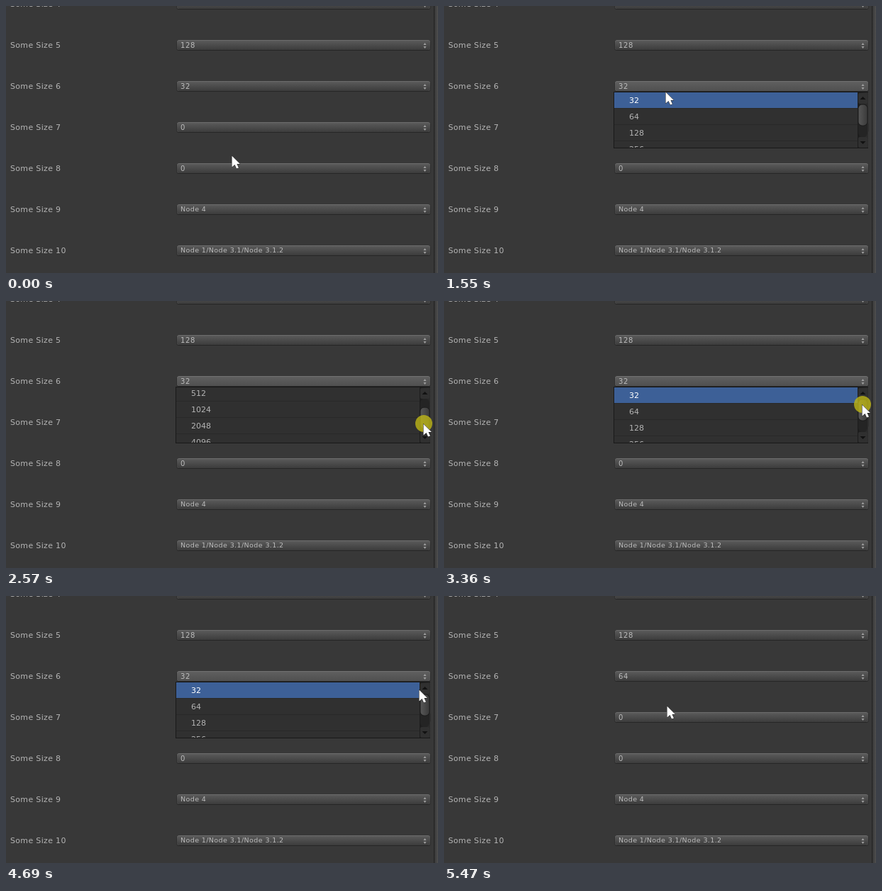
These frames come from a looping animation (609x377 px, 6170 ms). An HTML page with a canvas:

```html
<!DOCTYPE html>
<html lang="en">
<head>
<meta charset="utf-8">
<title>Dropdown demo</title>
<style>
  html, body { margin: 0; width: 100%; height: 100%; overflow: hidden; background: #383838; }
  canvas { display: block; }
</style>
</head>
<body>
<canvas id="stage" width="609" height="377"></canvas>
<script>
const ctx = document.getElementById('stage').getContext('2d');
const LOOP = 6170, TICK = 78;
const FONT = '"DejaVu Sans", Verdana, sans-serif';
const SIZES = Array.from({ length: 9 }, (_, i) => 32 << i);
const ROW = 23, VIEW_TOP = 122, VIEW_HEIGHT = 78;
const GRAB_Y = 160, SCROLL_GAIN = 7.3, MAX_SCROLL = SIZES.length * ROW - VIEW_HEIGHT - 1;
const OPEN = [1250, 5320], DRAG = [2330, 4060];
const PRESSES = [[1170, 1320], DRAG, [5240, 5470]];

// Pointer moves: first and last change, destination
const START = { x: 319, y: 211 };
const MOVES = [
  { from: 300, to: 710, x: 311, y: 121 },
  { from: 940, to: 1170, x: 297, y: 112 },
  { from: 1550, to: 1550, x: 313, y: 121 },
  { from: 1627, to: 2010, x: 589, y: 160 },
  { from: 2330, to: 2720, x: 589, y: 197 },
  { from: 2970, to: 3210, x: 590, y: 145 },
  { from: 3360, to: 3600, x: 588, y: 186 },
  { from: 3750, to: 3830, x: 586, y: 132 },
  { from: 4690, to: 5070, x: 315, y: 155 }
];

const clamp = (v, lo, hi) => Math.min(hi, Math.max(lo, v));
const within = (t, [from, to]) => t >= from && t < to;
const ease = p => p ** 2.5;

function pointerAt(t) {
  let { x, y } = START;
  for (const move of MOVES) {
    if (t < move.from) break;
    const steps = Math.round((move.to - move.from) / TICK) + 1;
    const done = t >= move.to ? steps : Math.floor((t - move.from) / TICK) + 1;
    const p = ease(Math.min(1, done / steps));
    x += (move.x - x) * p;
    y += (move.y - y) * p;
  }
  return { x: Math.round(x), y: Math.round(y) };
}

function rect(x, y, w, h, color) {
  ctx.fillStyle = color;
  ctx.fillRect(x, y, w, h);
}

function rounded(x, y, w, h, r, fill) {
  ctx.fillStyle = fill;
  ctx.beginPath();
  ctx.roundRect(x, y, w, h, r);
  ctx.fill();
}

function shade(x0, y0, x1, y1, from, to) {
  const g = ctx.createLinearGradient(x0, y0, x1, y1);
  g.addColorStop(0, from);
  g.addColorStop(1, to);
  return g;
}

function text(value, x, y, size = 11, spacing = 0, color = '#b4b4b4') {
  ctx.font = `${size}px ${FONT}`;
  ctx.letterSpacing = `${spacing}px`;
  ctx.fillStyle = color;
  ctx.fillText(value, x, y);
}

// dir is -1 for an upward arrow, 1 for a downward one
function arrow(x, y, half, height, dir, color) {
  ctx.fillStyle = color;
  ctx.beginPath();
  ctx.moveTo(x - half, y);
  ctx.lineTo(x + half, y);
  ctx.lineTo(x, y + dir * height);
  ctx.fill();
}

function field(n, value, open) {
  const y = 55 + (n - 5) * 58, top = y - 7;
  const isPath = value.startsWith('Node');
  text(`Some Size ${n}`, 6, y + 4, 11, 0.33);
  rounded(240.5, top, 358, 15, 3, '#262626');
  rounded(241, top, 357, 14, 3, open ? '#727272' : '#6c6c6c');
  rounded(241, top + 1, 357, 13, 3, open
    ? shade(0, top, 0, top + 14, '#606060', '#505050')
    : shade(0, top, 0, top + 14, '#5c5c5c', '#3c3c3c'));
  text(value, 246, y + (isPath ? 3 : 4), isPath ? 9.5 : 10, isPath ? 0.4 : 0.6, '#bcbcbc');
  arrow(590.5, y, 2, 3, -1, '#a0a0a0');
  arrow(590.5, y + 2, 2, 3, 1, '#a0a0a0');
}

function popup(scroll, pointer, selecting) {
  rect(239, 121, 359, 80, '#191919');
  ctx.save();
  ctx.beginPath();
  ctx.rect(240, VIEW_TOP, 343, VIEW_HEIGHT);
  ctx.clip();
  SIZES.forEach((size, i) => {
    const top = VIEW_TOP + i * ROW - scroll;
    const hovered = selecting && pointer.x < 583 && pointer.y >= top && pointer.y < top + ROW;
    rect(240, top, 343, ROW - 1, i ? '#303030' : '#3d6097');
    rect(240, top + ROW - 1, 343, 1, '#292929');
    text(size, 261, top + 15, 11, 0, !i || hovered ? '#fff' : '#b4b4b4');
  });
  ctx.restore();

  rect(583, VIEW_TOP, 15, VIEW_HEIGHT, shade(583, 0, 598, 0, '#1c1c1c', '#2d2d2d'));
  rounded(584, 123, 13, 15, 2, '#303030');
  rounded(584, 185, 13, 15, 2, '#303030');
  arrow(590.5, 132, 4, 4, -1, '#111');
  arrow(590.5, 191, 4, 4, 1, '#111');
  rounded(584, 138, 13, 47, 6, '#242424');
  const thumb = 139 + 15 * scroll / MAX_SCROLL;
  rounded(583.5, thumb - 0.5, 14, 31, 6, '#1d1d1d');
  rounded(584.5, thumb + 0.5, 12, 29, 5, shade(584, 0, 597, 0, '#585858', '#3a3a3a'));
}

const ARROW_SHAPE = new Path2D('M-.5 .5V16.5L3.5 13 6 18.5 9 17.4 6.5 12H11Z');

function drawPointer({ x, y }, pressed) {
  if (pressed) {
    ctx.fillStyle = 'rgba(190,182,22,.8)';
    ctx.beginPath();
    ctx.arc(x, y, 12, 0, Math.PI * 2);
    ctx.fill();
  }
  ctx.save();
  ctx.translate(x, y);
  ctx.fillStyle = '#fff';
  ctx.strokeStyle = '#111';
  ctx.stroke(ARROW_SHAPE);
  ctx.fill(ARROW_SHAPE);
  ctx.restore();
}

function draw(t) {
  const pointer = pointerAt(t);
  const open = within(t, OPEN);
  const scroll = within(t, DRAG)
    ? Math.round(clamp((pointer.y - GRAB_Y) * SCROLL_GAIN, 0, MAX_SCROLL)) : 0;

  rect(0, 0, 609, 377, '#383838');
  rect(603, 0, 1, 377, '#222');
  rect(604, 0, 5, 377, shade(604, 0, 609, 0, '#363636', '#505050'));

  const values = ['', '128', t >= OPEN[1] ? '64' : '32', '0', '0', 'Node 4',
    'Node 1/Node 3.1/Node 3.1.2'];
  values.forEach((value, i) => field(i + 4, value, open && i === 2));
  if (open) popup(scroll, pointer, t >= DRAG[1]);
  drawPointer(pointer, PRESSES.some(span => within(t, span)));
}

const start = performance.now();
function frame() {
  draw((performance.now() - start) % LOOP);
  requestAnimationFrame(frame);
}
frame();
</script>
</body>
</html>
```
